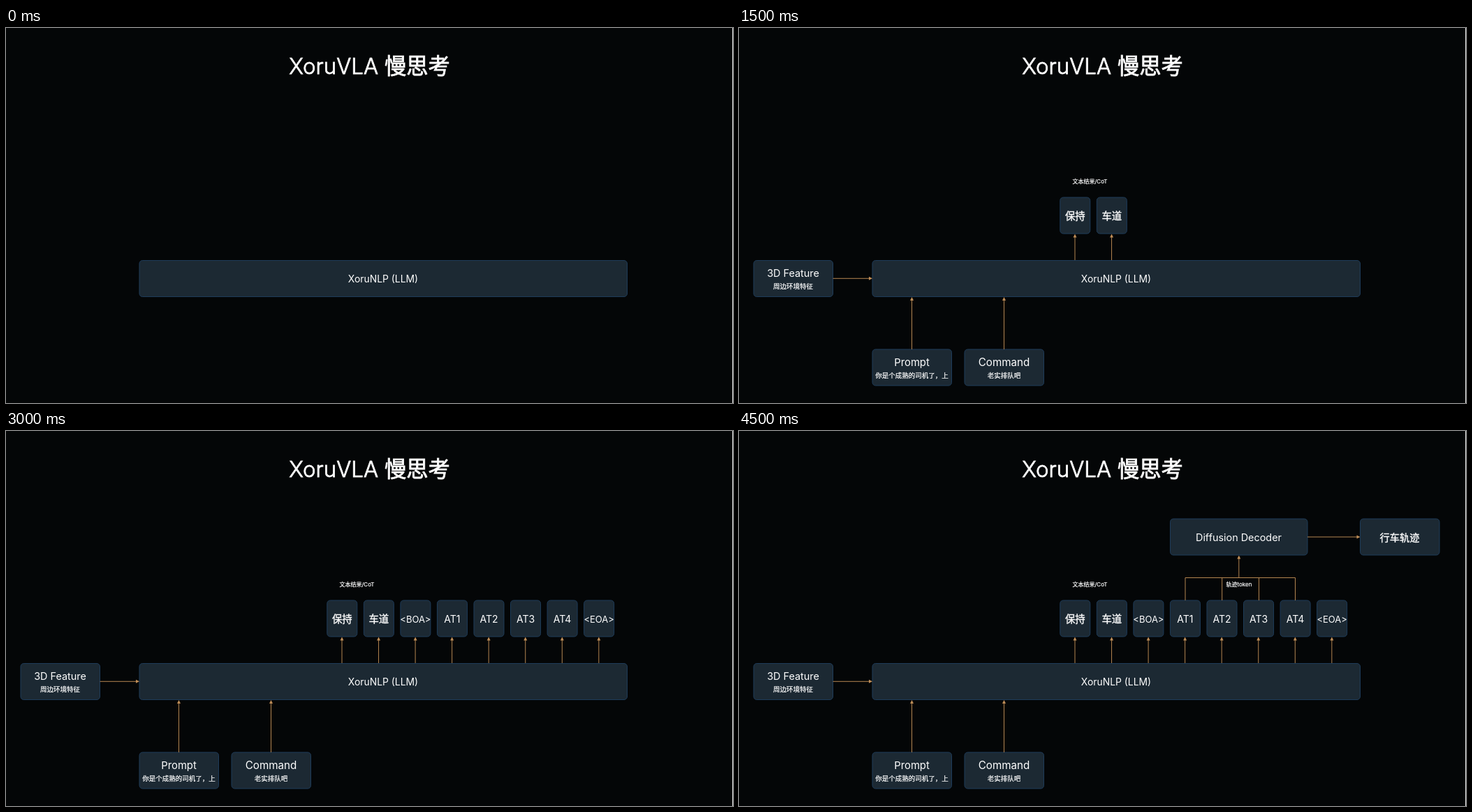
Write an HTML page that moves like this. It is 1041 by 538 pixels and loops after 9500 ms.

```html
<!DOCTYPE html>
<html lang="zh-CN">
<head>
<meta charset="utf-8">
<title>慢思考</title>
<style>
html, body { margin: 0; width: 100%; height: 100%; overflow: hidden; background: #040607; }
svg { display: block; }
rect { fill: #1c2933; stroke: #1e3c5a; }
path { fill: none; stroke: #b48550; }
.head { fill: #c08e58; stroke: none; }
.edge { stroke: #e8e8e8; }
text { fill: #fff; text-anchor: middle; font-family: Inter, "Noto Sans CJK SC", "Noto Sans CJK", sans-serif; }
.strong { stroke: #fff; stroke-width: .025em; }
</style>
</head>
<body>
<svg id="stage" width="1041" height="538" viewBox="0 0 1041 538"></svg>
<script>
const LOOP = 9500;
const stage = document.getElementById('stage');
const steps = [];
let layer;

function add(tag, attrs, parent = layer) {
  const el = document.createElementNS('http://www.w3.org/2000/svg', tag);
  for (const key in attrs) el.setAttribute(key, attrs[key]);
  return parent.appendChild(el);
}

// Everything drawn after this call appears at the given time.
function at(time) {
  layer = add('g', {}, stage);
  steps.push({ time, layer });
}

function label(str, x, y, size = 14.4, attrs = {}) {
  add('text', { x, y, 'font-size': size, ...attrs }).textContent = str;
}

// Chinese text is drawn slightly heavier than Latin text.
function strong(str, x, y, size, attrs = {}) {
  label(str, x, y, size, { class: 'strong', ...attrs });
}

function box(x, y, width, height = 52) {
  add('rect', { x, y, width, height, rx: 4.5 });
}

function line(d, attrs = {}) {
  add('path', { d, ...attrs });
}

function arrowUp(x, from, to) {
  line(`M${x} ${from}V${to + 3}`);
  line(`M${x} ${to}l2.5 5h-5z`, { class: 'head' });
}

function arrowRight(y, from, to) {
  line(`M${from} ${y}H${to - 3}`);
  line(`M${to} ${y}l-5 -2.5v5z`, { class: 'head' });
}

function card(x, y, name, note, size) {
  box(x, y, 113.5);
  label(name, x + 56.5, y + 23.5, size);
  strong(note, x + 56.5, y + 40.5, 9.5);
}

function token(i, name, size = 14.4, write = label) {
  const x = 481.3 + i * 52.55;
  box(x - 21.5, 243, 43);
  write(name, x, 274.5, size);
  arrowUp(x - 0.3, 333, 295.5);
}

at(0);
line('M1040.5 0V538', { class: 'edge' });
strong('XoruVLA 慢思考', 520.5, 66, 31.3, { 'font-weight': 300 });
box(191, 333.5, 698.5);
label('XoruNLP (LLM)', 540, 365, 13.9);

at(500);
card(21, 333.5, '3D Feature', '周边环境特征');
arrowRight(359.3, 134.5, 191);
card(191, 461, 'Prompt', '你是个成熟的司机了，上', 14.8);
arrowUp(247.5, 461, 386);
card(323, 461, 'Command', '老实排队吧', 15.2);
arrowUp(379.5, 461, 386);

at(1000);
strong('文本结果/CoT', 502.5, 222.7, 8);
token(0, '保持', 14.4, strong);

at(1500);
token(1, '车道', 14.4, strong);

at(2000);
token(2, '<BOA>', 13);

at(2500);
for (let n = 1; n <= 4; n++) token(n + 2, 'AT' + n, 14);

at(3000);
token(7, '<EOA>', 13);

at(3500);
line('M639 243V210.5H796.5V243M691.7 210.5V243M744.5 210.5V243');
arrowUp(715.8, 210.5, 178.5);
strong('轨迹token', 716, 222.7, 8);

at(4000);
box(617.5, 126, 196.5);
label('Diffusion Decoder', 715.5, 157.7);

at(4500);
arrowRight(152, 814, 889.5);
box(889.5, 126, 113.5);
strong('行车轨迹', 946, 157.7, 14.2);

const start = performance.now();
function draw() {
  const t = (performance.now() - start) % LOOP;
  for (const s of steps) s.layer.style.display = t >= s.time ? '' : 'none';
  requestAnimationFrame(draw);
}
draw();
</script>
</body>
</html>
```
